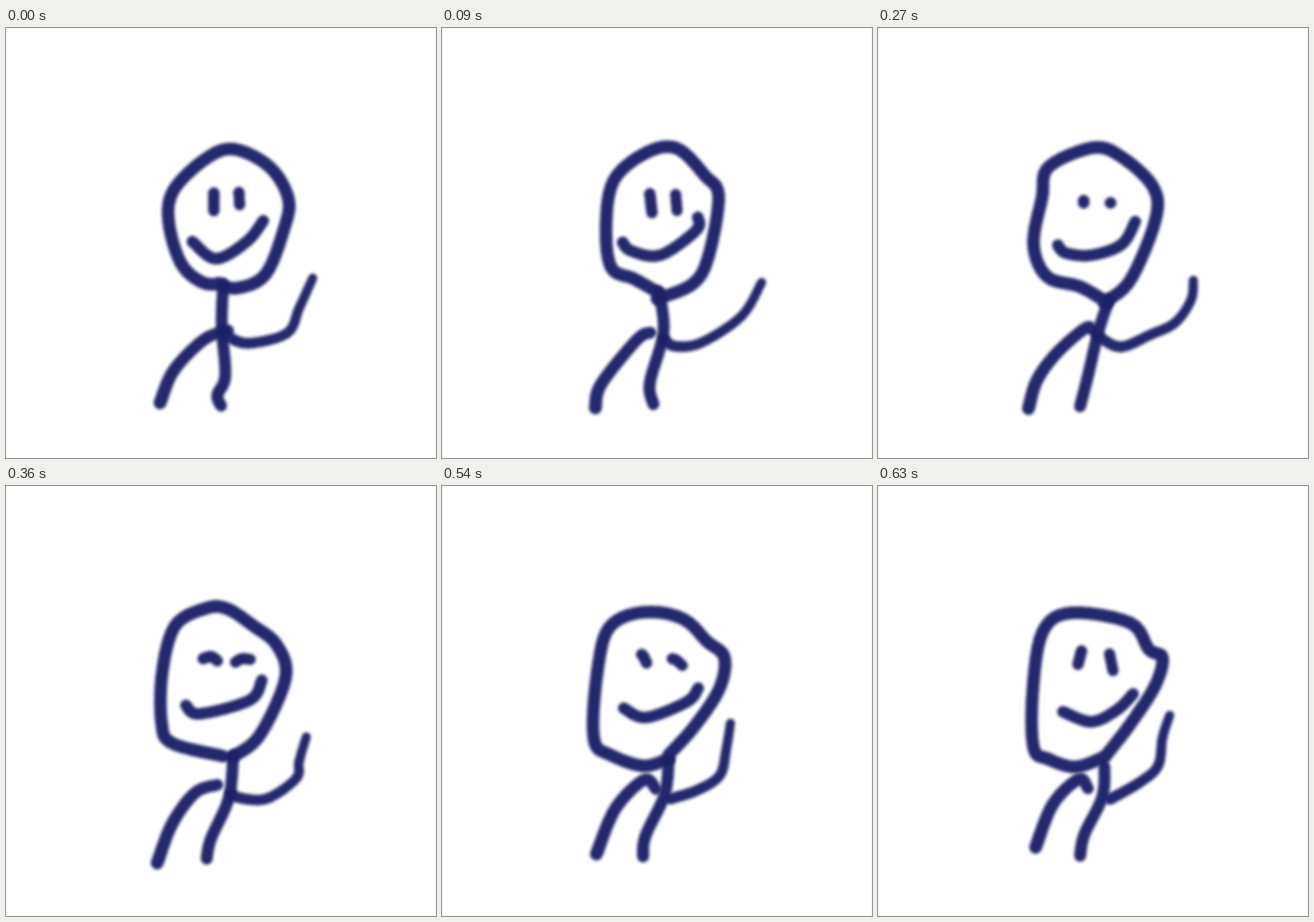
Write an HTML page that moves like this. It is 600 px wide and 600 px high and loops after 0.72 s.

```html
<!DOCTYPE html>
<html lang="en">
<head>
<meta charset="utf-8">
<title>Waving stick figure</title>
<style>
  html, body { margin: 0; width: 100%; height: 100%; overflow: hidden; background: #fff; }
  svg { display: block; width: 100%; height: 100%; }
  .brush { stroke: #1d2167; stroke-linecap: round; opacity: .965; filter: url(#soft); }
</style>
</head>
<body>
<svg id="stage" viewBox="0 0 600 600">
  <filter id="soft" filterUnits="userSpaceOnUse" x="0" y="0" width="600" height="600" color-interpolation-filters="sRGB">
    <feGaussianBlur stdDeviation="2.1"/>
  </filter>
  <rect x=".5" y=".5" width="599" height="599" fill="none" stroke="#f3f3f3"/>
</svg>
<script>
const STEP = 90;
const SVG = 'http://www.w3.org/2000/svg';
const stage = document.getElementById('stage');

// Brush width at the start and end of each stroke.
const WIDTH = {
  head: [17.5, 17.5], eyeL: [15.5, 15.5], eyeR: [15, 15], mouth: [16, 16],
  spine: [16.5, 16.5], leg: [16, 18], arm: [15.5, 12.5]
};

const lerp = (a, b, t) => a + (b - a) * t;

function add(parent, tag, attrs) {
  const el = document.createElementNS(SVG, tag);
  for (const key in attrs) el.setAttribute(key, attrs[key]);
  parent.append(el);
  return el;
}

// Catmull-Rom spline through key points, as a function of t in 0..1.
function curve(text) {
  const p = text.split(' ').map(s => s.split(',').map(Number));
  const last = p.length - 1;
  return t => {
    const i = Math.min(Math.floor(t * last), last - 1);
    const u = t * last - i;
    const b = p[i], c = p[i + 1], a = p[i - 1] || b, d = p[i + 2] || c;
    return [0, 1].map(k => b[k] + u / 2 * (c[k] - a[k]
      + u * (2 * a[k] - 5 * b[k] + 4 * c[k] - d[k]
      + u * (3 * (b[k] - c[k]) + d[k] - a[k]))));
  };
}

function pose(parts) {
  const out = {};
  for (const name in parts) out[name] = curve(parts[name]);
  return out;
}

// Halfway drawing; reach swings the hand further out.
function between(from, to, reach = 0) {
  const out = {};
  for (const name in from) {
    const push = name === 'arm' ? reach : 0;
    out[name] = t => {
      const [x, y] = from[name](t), [x2, y2] = to[name](t);
      return [lerp(x, x2, .5) + push * t, lerp(y, y2, .5)];
    };
  }
  return out;
}

function draw(parts) {
  const group = add(stage, 'g', { display: 'none' });
  for (const name in parts) {
    const brush = add(group, 'g', { class: 'brush' });
    const n = name === 'head' ? 72 : 24;
    for (let i = 0; i < n; i++) {
      const [x1, y1] = parts[name](i / n), [x2, y2] = parts[name]((i + 1) / n);
      add(brush, 'line', { x1, y1, x2, y2, 'stroke-width': lerp(...WIDTH[name], i / n) });
    }
  }
  return group;
}

const upright = pose({
  head: '303,357 274,355 244,328 227,270 234,226 278,183 318,169 368,194 394,238 388,280 362,344 322,363 296,356',
  eyeL: '290,230 290,255',
  eyeR: '325,229 326,247',
  mouth: '260,298 293,322 336,298 359,269',
  spine: '303,360 301,415 306,485 295,512 300,527',
  leg: '310,422 276,435 234,478 215,523',
  arm: '308,430 338,440 392,426 409,391 428,349'
});

const open = pose({
  head: '300,368 268,350 236,334 229,275 240,212 285,174 328,168 367,206 386,235 372,318 350,357 300,378',
  eyeL: '290,231 293,258',
  eyeR: '326,232 328,255',
  mouth: '252,299 264,311 305,317 355,282 357,264',
  spine: '303,368 309,425 290,495 295,525',
  leg: '291,425 272,435 222,497 214,530',
  arm: '310,434 325,444 362,439 418,402 446,355'
});

const dotEyed = pose({
  head: '320,383 282,361 236,347 217,302 229,236 238,194 300,167 340,180 384,222 387,268 352,352 315,383',
  eyeL: '287,241 287,244',
  eyeR: '324,244 325,244',
  mouth: '251,303 262,314 298,317 340,302 359,270',
  spine: '322,380 308,422 293,485 282,528',
  leg: '299,421 289,419 250,453 222,491 210,531',
  arm: '306,429 338,445 380,428 415,411 437,379 440,352'
});

const smiling = pose({
  head: '303,377 232,359 217,330 218,260 236,195 278,171 308,171 345,195 378,222 390,268 354,348 316,378',
  eyeL: '275,241 286,238 295,244',
  eyeR: '320,246 329,241 341,242',
  mouth: '251,306 270,318 340,299 357,271',
  spine: '317,376 311,435 286,492 280,520',
  leg: '295,417 264,428 232,471 211,526',
  arm: '314,430 330,436 365,436 405,408 409,384 419,350'
});

const leaning = pose({
  head: '316,384 285,389 230,368 207,340 219,235 240,193 300,173 352,201 389,232 388,285 354,337 318,370',
  eyeL: '273,240 282,238 292,245',
  eyeR: '319,248 330,241 343,243',
  mouth: '249,305 272,317 350,290 359,274',
  spine: '317,372 308,428 280,490 279,518',
  leg: '304,424 284,411 240,456 211,523',
  arm: '314,436 346,436 384,418 396,385 398,342'
});

const tilted = pose({
  head: '318,377 276,392 238,381 217,365 216,285 230,203 270,177 352,191 378,228 397,240 386,280 350,335 314,381',
  eyeL: '284,230 279,249',
  eyeR: '323,234 328,258',
  mouth: '258,315 298,329 334,312 356,290',
  spine: '316,392 313,434 288,486 282,516',
  leg: '293,422 280,409 244,444 220,504',
  arm: '324,437 366,413 391,390 397,351 407,320'
});

const loop = [
  upright, open, between(open, dotEyed, 14), dotEyed,
  smiling, leaning, between(leaning, tilted), tilted
].map(draw);

let start;
function tick(now) {
  start ??= now;
  const i = Math.floor(Math.max(0, now - start) / STEP) % loop.length;
  loop.forEach((g, k) => g.setAttribute('display', k === i ? 'inline' : 'none'));
  requestAnimationFrame(tick);
}
loop[0].setAttribute('display', 'inline');
requestAnimationFrame(tick);
</script>
</body>
</html>
```
